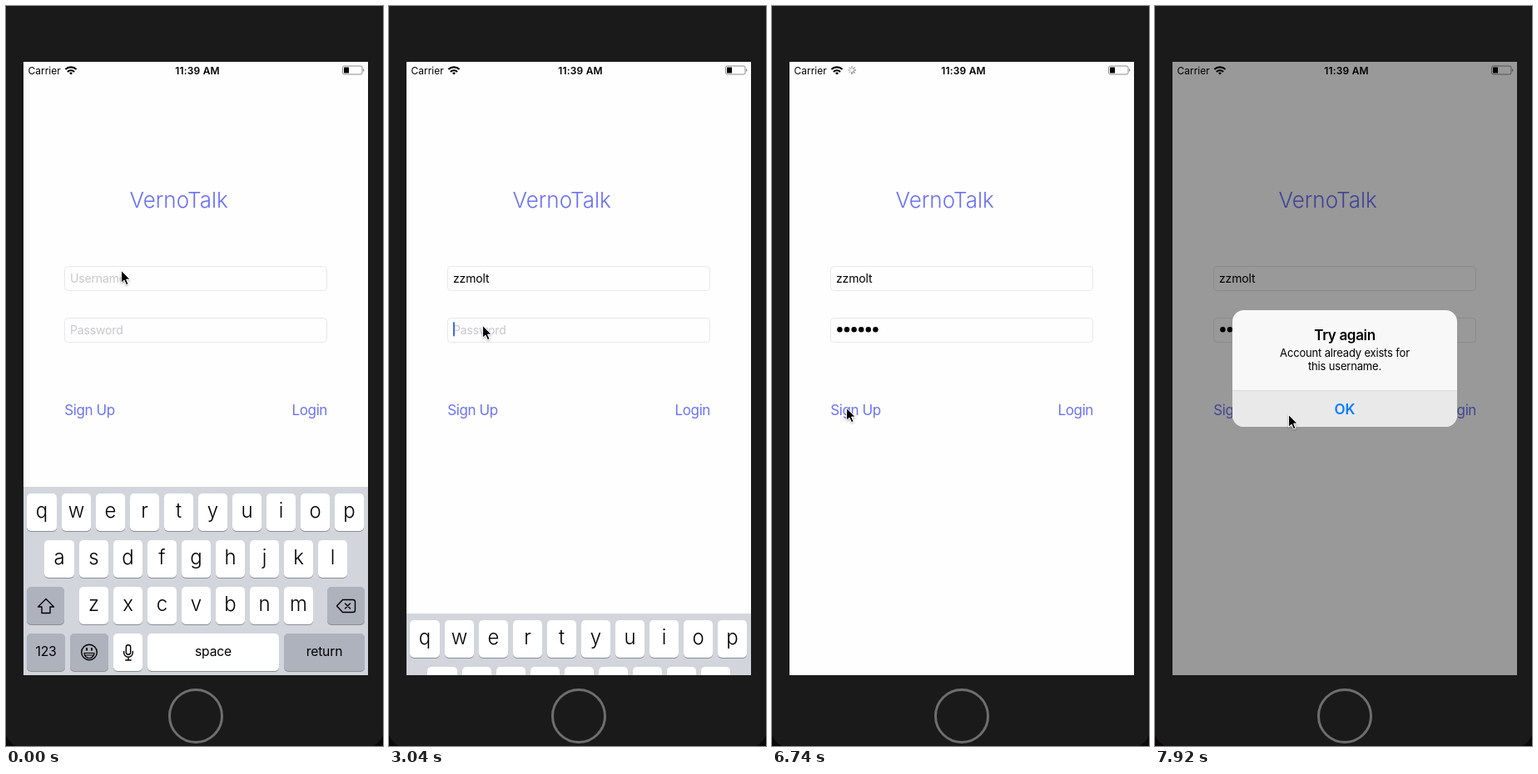
Animation of 453x888 px, one loop 8 s. Source, as an HTML page:

```html
<!DOCTYPE html>
<html lang="en">
<head>
<meta charset="utf-8">
<title>Chat sign up</title>
<style>
html, body { margin: 0; width: 100%; height: 100%; overflow: hidden; background: #1a1a1a; }
svg { display: block; width: 453px; height: 888px; }
text { font-family: Inter, "Liberation Sans", sans-serif; fill: #000; white-space: pre; }
.status { font-size: 12px; }
.clock { font-weight: 600; letter-spacing: .2px; text-anchor: middle; }
.title { font-size: 26px; font-weight: 300; fill: #6b70f7; }
.link { font-size: 17px; letter-spacing: -.4px; fill: #6b73f7; }
.input { font-size: 14px; letter-spacing: -.15px; }
.hint { fill: #c7c7cc; }
.field { fill: #fefefe; stroke: #e7e7e7; }
.caret { fill: #426bf2; }
.key { font-size: 24px; font-weight: 350; text-anchor: middle; }
.word { font-size: 15.7px; text-anchor: middle; letter-spacing: -.2px; }
.icon { fill: none; stroke: #000; stroke-width: 1.4; stroke-linejoin: round; stroke-linecap: round; }
.head { font-size: 17px; font-weight: 600; letter-spacing: -.35px; text-anchor: middle; }
.note { font-size: 13px; letter-spacing: -.17px; text-anchor: middle; }
.ok { fill: #087dfb; letter-spacing: 0; }
</style>
</head>
<body>
<svg viewBox="0 0 453 888">
  <defs>
    <clipPath id="screen"><rect x="21" y="67" width="414" height="736"/></clipPath>
    <clipPath id="card"><rect x="93" y="365" width="270" height="140" rx="14"/></clipPath>
    <filter id="soft" x="-50%" y="-50%" width="200%" height="200%">
      <feDropShadow dx="0" dy="1" stdDeviation="1" flood-opacity=".35"/>
    </filter>
  </defs>
  <rect width="453" height="888" fill="#1a1a1a"/>
  <path d="M0 875Q4 884 12 888H0ZM453 875Q449 884 441 888H453Z" fill="#0c0909"/>
  <circle cx="228" cy="852" r="31.5" fill="none" stroke="#6e6e6e" stroke-width="3"/>

  <g clip-path="url(#screen)">
    <rect x="21" y="67" width="414" height="736" fill="#fefefe"/>
    <text class="status" x="26.5" y="81.5">Carrier</text>
    <path d="M71.4 76.1A9.4 9.4 0 0 1 84.6 76.1M73.9 78.9A5.8 5.8 0 0 1 82.1 78.9" fill="none" stroke="#000" stroke-width="2.1"/>
    <path d="M76 80.5A2.8 2.8 0 0 1 80 80.5L78 82.6Z"/>
    <g id="spinner" stroke="#444" stroke-linecap="round"></g>
    <text class="status clock" x="230" y="81.5">11:39 AM</text>
    <rect x="404.5" y="72" width="23.5" height="10" rx="2" fill="none" stroke="#8c8c8c"/>
    <rect x="406" y="73.5" width="6" height="7" rx=".6"/>
    <path d="M429 75.2q1.5 .5 1.5 1.8t-1.5 1.8Z" fill="#8c8c8c"/>

    <text class="title" x="148.5" y="242">VernoTalk</text>
    <rect class="field" x="70.5" y="312.5" width="315" height="29" rx="4"/>
    <rect class="field" x="70.5" y="374.5" width="315" height="29" rx="4"/>
    <text class="input hint" id="userHint" x="77" y="331.5">Username</text>
    <text class="input" id="user" x="77" y="331.5"></text>
    <rect class="caret" id="userCaret" y="317.5" width="2" height="18" rx="1"/>
    <text class="input hint" id="passHint" x="77" y="393.5">Password</text>
    <g id="dots"></g>
    <text class="input" id="lastChar" y="393.5"></text>
    <rect class="caret" id="passCaret" y="379" width="2" height="17.5" rx="1"/>
    <text class="link" id="signUp" x="70.2" y="491">Sign Up</text>
    <text class="link" x="386" y="491" text-anchor="end">Login</text>

    <g id="keyboard">
      <rect x="21" y="577" width="414" height="226" fill="#d2d5db"/>
      <g id="keys"></g>
      <g class="icon">
        <path d="M48 711.5L57.5 721H53V728.5H43V721H38.5Z"/>
        <path d="M404.5 712.5H417Q419.5 712.5 419.5 715V725Q419.5 727.5 417 727.5H404.5L397.5 720Z"/>
        <path d="M407.5 717l6 6m0 -6l-6 6"/>
        <circle cx="100" cy="775.5" r="9.3"/>
        <path d="M94 776.5H106A6 6 0 0 1 94 776.5ZM95 779H105" stroke-width="1.2"/>
        <path d="M97 771v1.8M103 771v1.8" stroke-width="2"/>
        <rect x="144.3" y="766.8" width="5.4" height="11.4" rx="2.7"/>
        <path d="M141.7 774.5v1.5a5.3 5.3 0 0 0 10.6 0v-1.5M147 781.3v3.6M143.8 785h6.4"/>
      </g>
    </g>

    <rect id="dim" x="21" y="67" width="414" height="736"/>
    <g id="alert">
      <g id="panel" clip-path="url(#card)">
        <rect x="93" y="365" width="270" height="140" fill="#f8f8f8"/>
        <rect id="pressed" x="93" y="461" width="270" height="44" fill="#e9e9ea"/>
        <rect x="93" y="461" width="270" height=".7" fill="#d4d4d6"/>
      </g>
      <g id="words">
        <text class="head" x="228" y="401">Try again</text>
        <text class="note" x="228" y="421">Account already exists for</text>
        <text class="note" x="228" y="437">this username.</text>
        <text class="head ok" x="228" y="490">OK</text>
      </g>
    </g>
  </g>
  <path id="pointer" d="M.6 .4V15.2L4 12L6.5 17.7L9 16.6L6.6 11.1H11.1Z" stroke="#fff" filter="url(#soft)"/>
</svg>
<script>
const LOOP = 8000, STEP = 88.5;
const NS = "http://www.w3.org/2000/svg";
const $ = id => document.getElementById(id);
const set = (id, name, v) => $(id).setAttribute(name, v);
const show = (el, on) => el.setAttribute("visibility", on ? "visible" : "hidden");
const clamp = v => Math.max(0, Math.min(1, v));

function add(id, tag, attrs, label) {
  const el = document.createElementNS(NS, tag);
  for (const k in attrs) el.setAttribute(k, attrs[k]);
  if (label) el.textContent = label;
  return $(id).appendChild(el);
}

// Keyboard
function key(x, y, width, label, cls = "word", fill = "#fff") {
  const box = { x, width, height: 45, rx: 5 };
  add("keys", "rect", { ...box, y: y + 1, fill: "#8b8d92" });
  add("keys", "rect", { ...box, y, fill });
  add("keys", "text", { class: cls, x: x + width / 2, y: y + (cls === "key" ? 29 : 26.5) }, label);
}
function letters(row, x, y) {
  [...row].forEach((c, i) => {
    const left = x + 41.1 * i, edge = Math.ceil(left);
    key(edge, y, Math.floor(left + 36) - edge, c, "key");
  });
}
const DARK = "#adb2bd";
letters("qwertyuiop", 25, 585);
letters("asdfghjkl", 46, 641);
letters("zxcvbnm", 87.1, 697);
key(25, 697, 45, "", "word", DARK);
key(386, 697, 45, "", "word", DARK);
key(25, 753, 46, "123", "word", DARK);
key(77, 753, 46, "", "word", DARK);
key(129, 753, 35, "");
key(170, 753, 158, "space");
key(334, 753, 97, "return", "word", DARK);

const PITCH = 8.6, SPOKES = 8;
const dots = Array.from({ length: 6 }, (_, i) =>
  add("dots", "circle", { cx: 81.4 + PITCH * i, cy: 388.3, r: 3.2 }));
const spokes = Array.from({ length: SPOKES }, (_, i) =>
  add("spinner", "path", { d: "M96 74.6V72.4", transform: `rotate(${i * 360 / SPOKES} 96 77)` }));

// Critically damped spring, rate per second
function spring(t, start, rate) {
  const x = Math.max(0, t - start) / 1000 * rate;
  return 1 - (1 + x) * Math.exp(-x);
}
const easeOut = p => 1 - (1 - p) ** 3;

// Soft caret blink, restarted by the last key press
function blink(t, last) {
  const phase = Math.max(0, t - last) % 1080;
  return clamp(.75 + 1.5 * Math.cos(2 * Math.PI * (phase - 240) / 1080));
}

const USER = "zzmolt", PASS = "forest";
const userTimes = [380, 560, 1090, 1180, 1450, 1620];
const passTimes = [...PASS].map((_, i) => 4165 + 106 * i);
const FOCUS = 2869, MASK = 5580, ALERT = 6741;

function typed(time, times, start) {
  const hit = times.filter(x => time >= x);
  return { n: hit.length, last: hit.length ? hit[hit.length - 1] : start };
}

const moves = [
  { from: 2100, to: 2770, x: 112, y: 383 },
  { from: 4800, to: 5850, x: 89, y: 482 },
  { from: 7300, to: 7870, x: 160, y: 490 }
];
function pointerAt(t) {
  let x = 138, y = 317;
  for (const m of moves) {
    const p = easeOut(clamp((t - m.from) / (m.to - m.from)));
    x += (m.x - x) * p;
    y += (m.y - y) * p;
  }
  return `translate(${x} ${y})`;
}

function draw(time) {
  const t = Math.floor(time / STEP) * STEP;

  const user = typed(time, userTimes, -720);
  $("user").textContent = USER.slice(0, user.n);
  show($("userHint"), !user.n);
  set("userCaret", "x", 77 + (user.n ? $("user").getComputedTextLength() : 0));
  set("userCaret", "opacity", t < FOCUS ? blink(t, user.last) : 0);

  // The newest password letter stays readable for a moment
  const pass = typed(time, passTimes, FOCUS + 51);
  const open = pass.n > 0 && time < MASK;
  const hidden = pass.n - open;
  const end = 77 + hidden * PITCH;
  show($("passHint"), !pass.n);
  dots.forEach((d, i) => show(d, i < hidden));
  $("lastChar").textContent = open ? PASS[hidden] : "";
  set("lastChar", "x", end);
  set("passCaret", "x", end + (open ? $("lastChar").getComputedTextLength() : 0));
  set("passCaret", "opacity", t >= FOCUS && t < ALERT ? blink(t, pass.last) : 0);

  set("keyboard", "transform", `translate(0 ${226.5 * spring(t, FOCUS, 16.5)})`);
  set("signUp", "opacity", t < 5650 ? 1 : .2 + .8 * clamp((t - 5940) / 450));

  show($("spinner"), t > 6360 && t < 7000);
  const lead = Math.floor(t / STEP);
  spokes.forEach((s, i) =>
    s.setAttribute("opacity", 1 - (lead - i + 10 * SPOKES * SPOKES) % SPOKES * .08));

  const p = spring(t, ALERT, 18);
  set("dim", "opacity", .4 * p);
  set("alert", "transform", `translate(228 435) scale(${1.2 - .2 * p}) translate(-228 -435)`);
  set("panel", "opacity", clamp(1.5 * p));
  set("words", "opacity", p);
  show($("pressed"), time >= 7900);

  set("pointer", "transform", pointerAt(t));
}

function loop() {
  draw(performance.now() % LOOP);
  requestAnimationFrame(loop);
}
loop();
</script>
</body>
</html>
```
